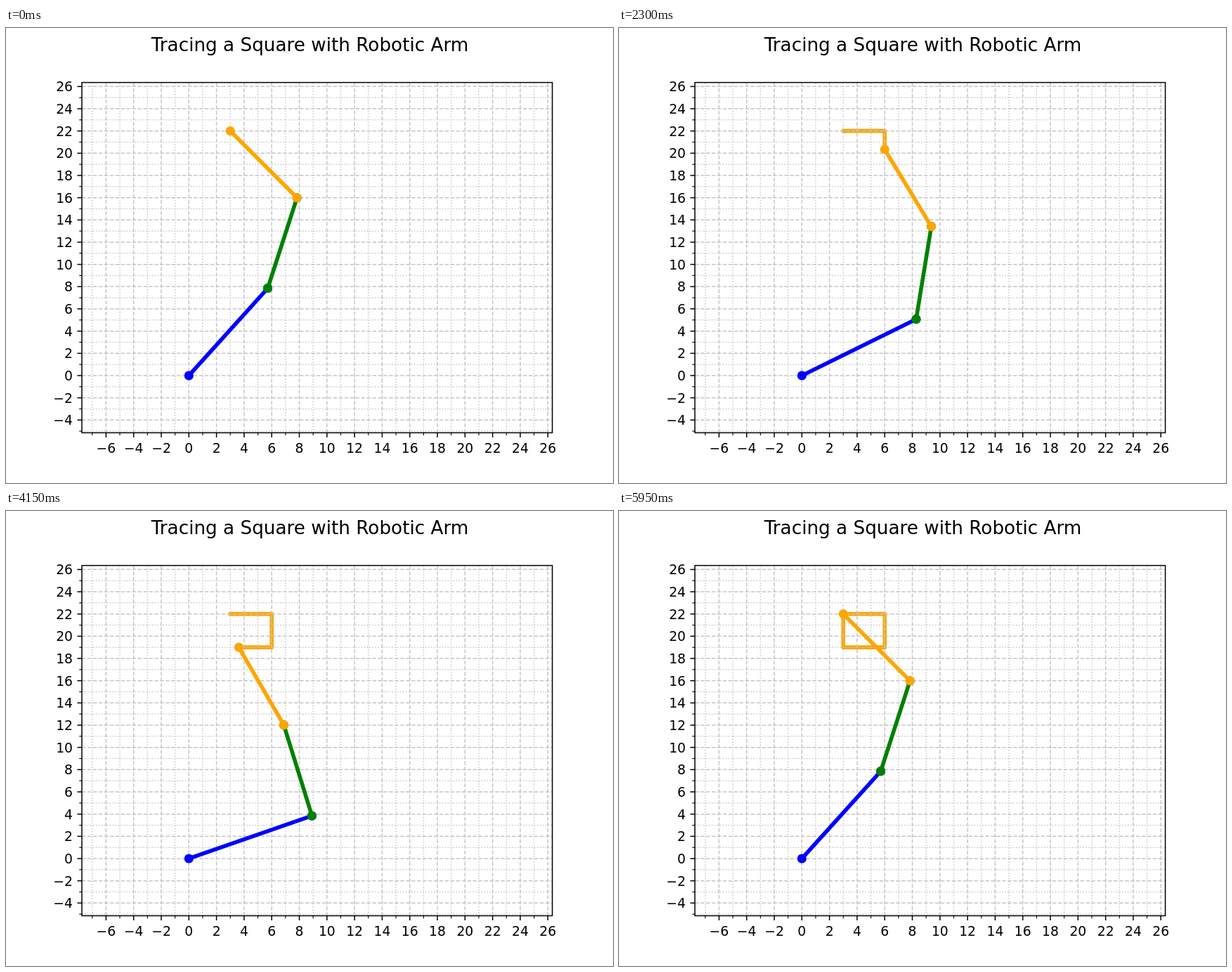
Animation of 864x648 px, one loop 6 s. Source, as an HTML page:

```html
<!DOCTYPE html>
<html lang="en">
<head>
<meta charset="utf-8">
<title>Robotic arm</title>
<style>
  html, body { margin: 0; width: 100%; height: 100%; overflow: hidden; background: #fff; }
  svg { display: block; width: 864px; height: 648px; }
  text { font-family: "DejaVu Sans", sans-serif; font-size: 18.75px; fill: #000; }
  path, line { fill: none; }
  .major { stroke: #c6c6c6; stroke-width: 1.5; stroke-dasharray: 5.55 2.4; }
  .minor { stroke: #c6c6c6; stroke-width: 1.5; stroke-dasharray: 1.5 2.475; }
  .tick { stroke: #000; stroke-width: 1.5; }
  .small { stroke: #000; stroke-width: 1.125; }
</style>
</head>
<body>
<svg id="stage" viewBox="0 0 864 648"></svg>
<script>
const stage = document.getElementById('stage');
const BOX = { left: 108, right: 777.6, top: 77.6, bottom: 576.45 };
const LENGTHS = [9.71, 8.41, 7.71];
const STEP_MS = 50, SIDE_STEPS = 30;

// Corners of the traced square, with the heading of the last link in degrees.
const CORNERS = [[3, 22, 128.8], [6, 22, 99.8], [6, 19, 129.1], [3, 19, 111.3]];

const px = x => 260.3 + 19.652 * x;
const py = y => 495 - 15.833 * y;

function add(tag, attrs, text) {
  const node = document.createElementNS('http://www.w3.org/2000/svg', tag);
  for (const key in attrs) node.setAttribute(key, attrs[key]);
  if (text !== undefined) node.textContent = text;
  return stage.appendChild(node);
}

// The trace lies beneath the grid.
const trace = add('path', {
  stroke: 'orange', 'stroke-width': 5.6, 'stroke-linecap': 'round', 'stroke-linejoin': 'round'
});

function drawGrid(odd) {
  const style = odd ? 'minor' : 'major';
  for (let v = -7; v <= 26; v++) {
    if (Math.abs(v % 2) !== odd) continue;
    add('path', { class: style, d: `M${px(v)} ${BOX.bottom}V${BOX.top}` });
    if (v >= -5) add('path', { class: style, d: `M${BOX.left} ${py(v)}H${BOX.right}` });
  }
}

function drawAxes() {
  for (let v = -7; v <= 26; v++) {
    const even = v % 2 === 0;
    const style = even ? 'tick' : 'small', size = even ? 6.56 : 3.75;
    const label = String(v).replace('-', '\u2212');
    add('path', { class: style, d: `M${px(v)} ${BOX.bottom}v${size}` });
    if (even) add('text', { x: px(v), y: 604.5, 'text-anchor': 'middle' }, label);
    if (v < -5) continue;
    add('path', { class: style, d: `M${BOX.left} ${py(v)}h${-size}` });
    if (even) add('text', { x: 95, y: py(v) + 6.9, 'text-anchor': 'end' }, label);
  }
}

drawGrid(1);
drawGrid(0);
drawAxes();

const links = ['blue', 'green', 'orange'].map(color => ({
  bar: add('line', { stroke: color, 'stroke-width': 5.6, 'stroke-linecap': 'square' }),
  joints: [0, 1].map(() => add('circle', { r: 6.56, fill: color }))
}));

add('rect', {
  x: BOX.left, y: BOX.top, width: BOX.right - BOX.left, height: BOX.bottom - BOX.top,
  fill: 'none', stroke: '#000', 'stroke-width': 1.5
});
add('text', { x: 432.5, y: 33, 'text-anchor': 'middle', style: 'font-size:26.25px' },
  'Tracing a Square with Robotic Arm');

// Tip position and heading; each side includes both of its corners.
function target(step) {
  const side = Math.floor(step / SIDE_STEPS);
  const s = (step % SIDE_STEPS) / (SIDE_STEPS - 1);
  const from = CORNERS[side], to = CORNERS[(side + 1) % 4];
  return from.map((v, i) => v + (to[i] - v) * s);
}

function solveArm([x, y, heading]) {
  const [a, b, c] = LENGTHS;
  const phi = heading * Math.PI / 180;
  const wx = x - c * Math.cos(phi), wy = y - c * Math.sin(phi);
  const d = Math.hypot(wx, wy);
  const shoulder = Math.atan2(wy, wx) - Math.acos((a * a + d * d - b * b) / (2 * a * d));
  return [[0, 0], [a * Math.cos(shoulder), a * Math.sin(shoulder)], [wx, wy], [x, y]];
}

function render(time) {
  const step = Math.floor(time / STEP_MS) % (4 * SIDE_STEPS);
  const tip = target(step);
  const points = solveArm(tip).map(([x, y]) => [px(x), py(y)]);
  links.forEach(({ bar, joints }, i) => {
    joints.forEach((joint, k) => {
      const [x, y] = points[i + k];
      bar.setAttribute('x' + (k + 1), x);
      bar.setAttribute('y' + (k + 1), y);
      joint.setAttribute('cx', x);
      joint.setAttribute('cy', y);
    });
  });
  const passed = CORNERS.slice(0, Math.floor(step / SIDE_STEPS) + 1);
  trace.setAttribute('d', 'M' + [...passed, tip].map(([x, y]) => `${px(x)} ${py(y)}`).join('L'));
}

const start = performance.now();
function tick() {
  render(performance.now() - start);
  requestAnimationFrame(tick);
}
render(0);
requestAnimationFrame(tick);
</script>
</body>
</html>
```
